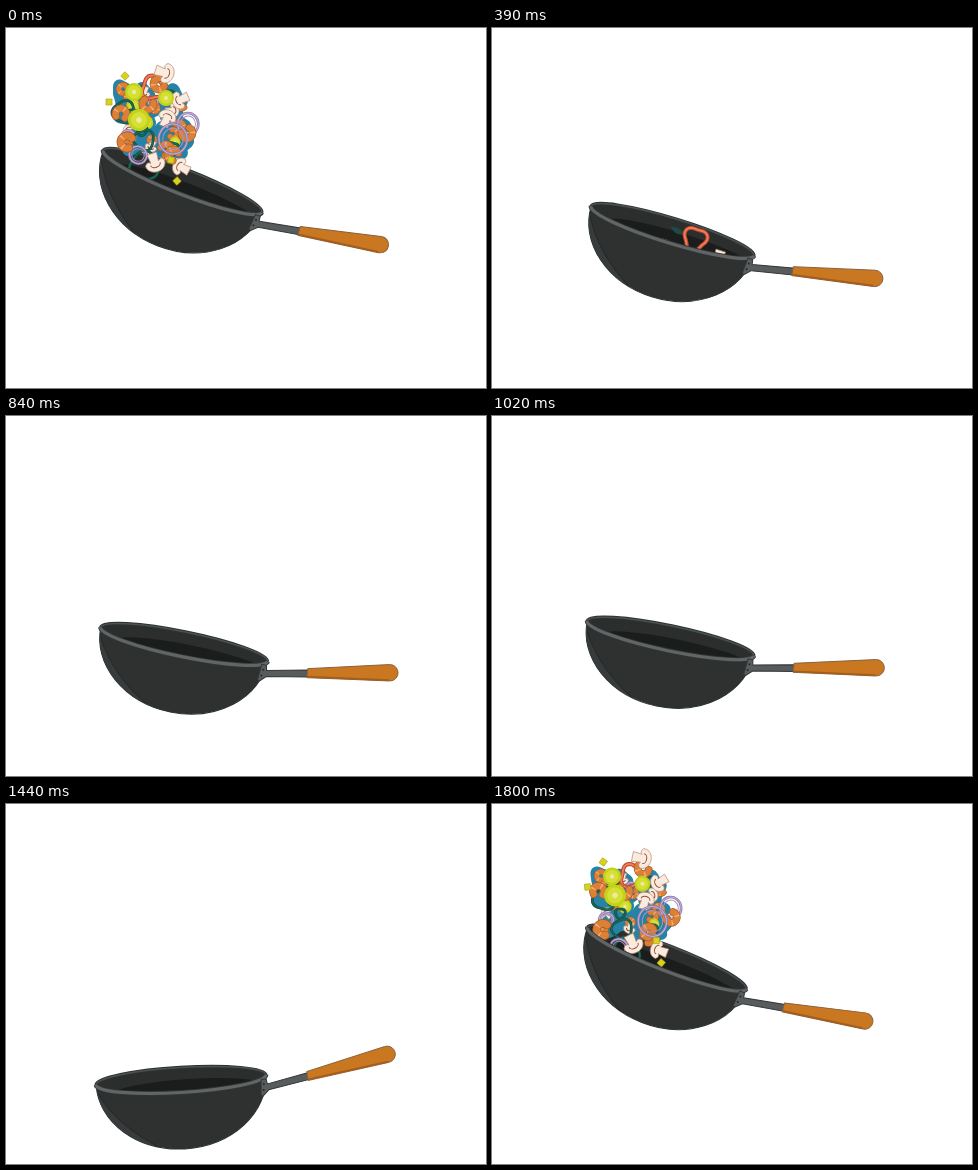
Recreate the animation shown at these times as an HTML page with a canvas. Size 480 by 360 pixels, loop 1.83 s.

```html
<!DOCTYPE html>
<html lang="en">
<head>
<meta charset="utf-8">
<title>Wok toss</title>
<style>
html, body { margin: 0; width: 100%; height: 100%; overflow: hidden; background: #fff; }
canvas { display: block; }
</style>
</head>
<body>
<canvas id="stage" width="480" height="360"></canvas>
<script>
const ctx = document.getElementById('stage').getContext('2d');
const LOOP = 1830, STEP = 30, TAU = Math.PI * 2;
const RIM_X = 85, RIM_Y = 12.5, DEPTH = 69;

// time, rim centre x, rim centre y, tilt in degrees
const poses = [
  [0, 176.5, 153.5, 21.4], [150, 182.5, 167.5, 22], [390, 180.5, 203, 16.9],
  [540, 179, 217, 13.5], [630, 178, 225, 12.1], [780, 178, 229.5, 11.5],
  [1020, 178.5, 222.5, 11.8], [1200, 177.5, 236, 7], [1440, 175, 276, -3.4],
  [1530, 164, 262, -7], [1620, 148, 226, -8], [1710, 160, 177, 8],
  [1800, 174.8, 154.2, 21.3]
];

// kind, place at launch (x, y), place five steps later (x, y), size
const pieces = [
  ['leaf', 134, 62, 168, 48, 8], ['pepper', 147, 60, 184, 50, 11],
  ['green', 138, 138, 162, 137, 14], ['green', 118, 84, 147, 80, 11],
  ['green', 138, 112, 177, 97, 10], ['onion', 182, 96, 198, 107, 11],
  ['onion', 132, 127, 157, 95, 9], ['shrimp', 153, 56, 162, 64, 9],
  ['shrimp', 115, 86, 158, 130, 9], ['shrimp', 181, 105, 190, 115, 9],
  ['shrimp', 121, 114, 172, 107, 10], ['shrimp', 160, 122, 180, 117, 9],
  ['shrimp', 142, 76, 192, 70, 9], ['slice', 159, 45, 203, 49, 10],
  ['slice', 174, 72, 209, 90, 9], ['slice', 161, 90, 200, 109, 9],
  ['slice', 149, 135, 189, 160, 10], ['slice', 175, 139, 217, 155, 9],
  ['shrimp', 167, 127, 220, 173, 9], ['lime', 160, 70, 208, 72, 8],
  ['lime', 128, 64, 168, 73, 9], ['lime', 133, 92, 183, 146, 11],
  ['onion', 167, 111, 200, 130, 15], ['cube', 119, 48, 158, 49, 3],
  ['cube', 103, 74, 140, 80, 3], ['cube', 171, 153, 180, 175, 3],
  ['cube', 165, 132, 168, 160, 3]
];

let seed = 11;
const rand = () => (seed = (seed * 16807) % 2147483647) / 2147483647;

// Fills the tossed column evenly, cycling through the given kinds
function scatter(count, kinds, size) {
  return Array.from({ length: count }, (_, i) => {
    const u = (i % 3 + rand()) / 3, v = (i + rand()) / count;
    return [kinds[i % kinds.length], 116 + u * 60, 61 + v * 62,
      157 + u * 54, 58 + v * 90, size * (0.8 + rand() * 0.4)];
  });
}
const food = [
  ...scatter(24, ['blue'], 11),
  ...scatter(24, ['shrimp', 'slice', 'green', 'shrimp', 'onion', 'shrimp', 'lime'], 6),
  ...pieces
];

// Smooth periodic interpolation without overshoot
function poseAt(t) {
  const count = poses.length;
  const key = i => {
    const turn = Math.floor(i / count), p = poses[i - turn * count];
    return [p[0] + turn * LOOP, p[1], p[2], p[3]];
  };
  let i = count - 1;
  while (poses[i][0] > t) i--;
  const a = key(i), b = key(i + 1), h = b[0] - a[0], u = (t - a[0]) / h;
  const slope = (j, c) => {
    const p = key(j - 1), q = key(j), r = key(j + 1);
    const m = (q[c] - p[c]) / (q[0] - p[0]), n = (r[c] - q[c]) / (r[0] - q[0]);
    return m * n > 0 ? 2 * m * n / (m + n) : 0;
  };
  const at = c => {
    const w = u * u * (3 - 2 * u);
    return a[c] + (b[c] - a[c]) * w
      + h * u * (1 - u) * ((1 - u) * slope(i, c) - u * slope(i + 1, c));
  };
  return { x: at(1), y: at(2), tilt: at(3) * Math.PI / 180 };
}

function paint(fill, line, width = 1) {
  if (fill) { ctx.fillStyle = fill; ctx.fill(); }
  if (line) { ctx.strokeStyle = line; ctx.lineWidth = width; ctx.stroke(); }
}

function oval(x, y, rx, ry = rx, from = 0, to = TAU) {
  ctx.beginPath();
  ctx.ellipse(x, y, rx, ry, 0, from, to);
}

function wobble(r, amount, lobes) {
  ctx.beginPath();
  for (let i = 0; i < 40; i++) {
    const a = i / 40 * TAU, d = r * (1 + amount * Math.cos(lobes * a));
    ctx.lineTo(d * Math.cos(a), d * Math.sin(a));
  }
  ctx.closePath();
}

const draw = {
  blue(r) {
    wobble(r, 0.12, 3);
    paint('#2583a8');
  },
  shrimp(r) {
    ctx.lineCap = 'round';
    oval(0, 0, r * 0.62, r * 0.62, 0.3, 4.6);
    paint(null, '#a85a2a', r * 0.86);
    paint(null, '#dc8036', r * 0.7);
    ctx.lineCap = 'butt';
    for (const a of [1.2, 2.8]) {
      oval(0, 0, r * 0.62, r * 0.62, a, a + 0.25);
      paint(null, '#f0ae78', r * 0.6);
    }
  },
  lime(r) {
    oval(0, 0, r);
    paint('#c2d31a');
    oval(0, 0, r * 0.72);
    paint('#d6e034');
    oval(0, 0, r * 0.25);
    paint('#ecea9c');
  },
  cube(r) {
    ctx.beginPath();
    ctx.rect(-r, -r, 2 * r, 2 * r);
    paint('#d9d21c', '#b0a51b', 0.7);
  },
  slice(r) {
    ctx.beginPath();
    ctx.moveTo(-r, 0);
    ctx.bezierCurveTo(-r, -r * 1.2, r, -r * 1.2, r, 0);
    ctx.quadraticCurveTo(r * 0.7, r * 0.4, r * 0.4, r * 0.1);
    ctx.lineTo(r * 0.5, r);
    ctx.lineTo(-r * 0.5, r);
    ctx.lineTo(-r * 0.4, r * 0.1);
    ctx.quadraticCurveTo(-r * 0.7, r * 0.4, -r, 0);
    paint('#fbebdf', '#b98e78', 0.7);
    oval(0, -r * 0.1, r * 0.5, r * 0.35, Math.PI, TAU);
    paint(null, '#8b4e38', 1);
  },
  onion(r) {
    oval(0, 0, r, r * 0.94);
    paint(null, '#8f78ad', 2.6);
    paint(null, '#c2b1d3', 1);
    oval(0, 0, r * 0.72, r * 0.68);
    paint(null, '#a792bd', 1);
  },
  green(r) {
    wobble(r, 0.1, 3);
    paint(null, '#145346', 2.8);
    paint(null, '#257561', 0.8);
  },
  pepper(r) {
    wobble(r, 0.15, 3);
    paint(null, '#b9432b', 4);
    paint(null, '#ee7d58', 2);
  },
  leaf(r) {
    ctx.beginPath();
    ctx.moveTo(-r, 0);
    ctx.quadraticCurveTo(0, -r * 0.8, r, 0);
    ctx.quadraticCurveTo(0, r * 0.6, -r, 0);
    paint('#1c4b40');
  }
};

function drawFood(n, pan) {
  food.forEach(([kind, x0, y0, x1, y1, size], i) => {
    const g = 1.7, lift = (y1 - y0 - 25 * g) / 5;
    const drift = n < 0 ? Math.exp(n / 4.5) - 1
      : (1 - Math.exp(-n / 5.5)) / (1 - Math.exp(-5 / 5.5));
    let x = x0 + (x1 - x0) * drift;
    let y = y0 + lift * n + g * n * n;
    if (n < -2) {
      const sink = ((-2 - n) / 5) ** 2;
      x += (pan.x - x) * sink;
      y += (pan.y + 36 - y) * sink;
    }
    const dx = x - pan.x, dy = y - pan.y;
    if (dy * Math.cos(pan.tilt) - dx * Math.sin(pan.tilt) > 32) return;
    ctx.save();
    ctx.translate(x, y);
    ctx.rotate(i * 2.4 + n * 0.12);
    draw[kind](size);
    ctx.restore();
  });
}

function inPan(pan, body) {
  ctx.save();
  ctx.translate(pan.x, pan.y);
  ctx.rotate(pan.tilt);
  body();
  ctx.restore();
}

function inside() {
  ctx.save();
  oval(0, 0, RIM_X, RIM_Y);
  paint('#2c2e2e');
  ctx.clip();
  oval(8, 9, 74, 9.5);
  paint('#1b1c1c');
  ctx.restore();
  oval(0, 0, RIM_X, RIM_Y, Math.PI, TAU);
  paint(null, '#2b3233', 3.4);
  paint(null, '#4c5050', 1.5);
}

function outside() {
  ctx.beginPath();
  ctx.ellipse(0, 0, RIM_X, DEPTH, 0, 0, Math.PI);
  ctx.ellipse(0, 0, RIM_X, RIM_Y, 0, Math.PI, 0, true);
  ctx.closePath();
  paint('#2f3030', '#293334', 1);

  ctx.save();
  ctx.clip();
  ctx.beginPath();
  ctx.moveTo(-83, 10);
  ctx.quadraticCurveTo(-65, 43, -25, 66);
  ctx.lineTo(-90, 75);
  ctx.lineTo(-90, 5);
  paint('#373b3c');
  ctx.beginPath();
  ctx.moveTo(-83, 10);
  ctx.quadraticCurveTo(-65, 43, -25, 66);
  paint(null, '#262828', 1);
  ctx.restore();

  oval(0, 0, RIM_X, RIM_Y, 0, Math.PI);
  paint(null, '#303536', 5);
  paint(null, '#626565', 3.2);
}

function handle() {
  ctx.beginPath();
  ctx.moveTo(80, 4);
  ctx.lineTo(85, 4);
  ctx.lineTo(86, 9);
  ctx.lineTo(128, 0);
  ctx.lineTo(128, 7);
  ctx.lineTo(87, 15);
  ctx.lineTo(81, 21);
  ctx.lineTo(79, 20);
  ctx.closePath();
  paint('#595c5d', '#333738', 1);
  oval(82.5, 9, 1);
  paint('#262828');
  oval(82, 15, 1);
  paint('#262828');

  ctx.beginPath();
  ctx.moveTo(126, -1);
  ctx.lineTo(205, -21.3);
  ctx.arc(207.3, -13.4, 8.2, -1.82, 1.4);
  ctx.lineTo(127, 8);
  ctx.closePath();
  paint('#ca7722', '#85603c', 0.9);
  ctx.beginPath();
  ctx.moveTo(127, 7);
  ctx.lineTo(208, -6);
  paint(null, '#a65d1b', 1.8);
}

function frame(now) {
  const t = Math.floor((now % LOOP) / STEP) * STEP;
  const pan = poseAt(t);
  const n = (t > 1600 ? t - LOOP : t) / STEP;
  ctx.fillStyle = '#fff';
  ctx.fillRect(0, 0, 480, 360);
  inPan(pan, inside);
  if (n >= -7 && n <= 18) drawFood(n, pan);
  inPan(pan, () => { outside(); handle(); });
}

const start = performance.now();
function tick() {
  frame(performance.now() - start);
  requestAnimationFrame(tick);
}
tick();
</script>
</body>
</html>
```
